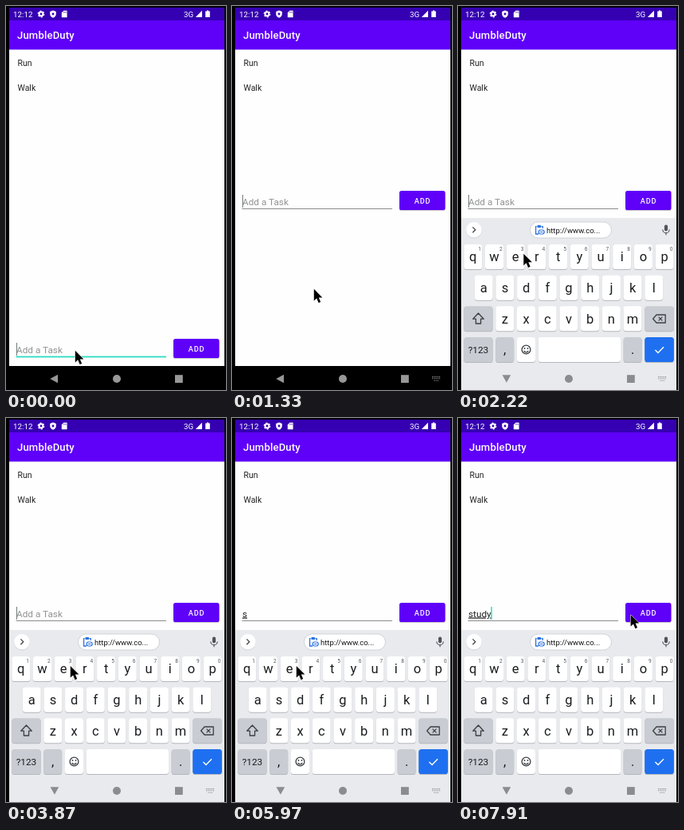
An HTML page for the animation above (8000 ms loop, 276 px wide and 480 px high).

```html
<!DOCTYPE html>
<html lang="en">
<head>
<meta charset="utf-8">
<title>To-do list</title>
<style>
  html, body { margin: 0; width: 100%; height: 100%; overflow: hidden; background: #000; }
  svg { display: block; width: 276px; height: 480px; font-family: Roboto, sans-serif; }
  .mid { text-anchor: middle; }
  .med { font-weight: 500; }
  .u { text-decoration: underline; }
</style>
</head>
<body>
<svg viewBox="0 0 276 480">
  <rect width="276" height="480" fill="#000"/>
  <rect x="4" y="2" width="270" height="17" fill="#3500b2"/>
  <rect x="4" y="18" width="270" height="37" fill="#5f00f8"/>
  <rect x="4" y="54.5" width="270" height="395.5" fill="#fefefe"/>

  <g fill="#fff" font-size="9.8">
    <text x="9" y="13.5">12:12</text>
    <circle cx="44" cy="10" r="2.4" fill="none" stroke="#fff" stroke-width="2"/>
    <circle cx="44" cy="10" r="3.8" fill="none" stroke="#fff" stroke-width="1.2" stroke-dasharray="2 1.98"/>
    <path d="M59 5.4L62.8 7V10Q62.8 13.2 59 14.8Q55.2 13.2 55.2 10V7Z"/>
    <circle cx="59" cy="10" r="1.4" fill="#3500b2"/>
    <path d="M72.4 5.8H76.6V14.2H69.8V8.4Z"/>
    <path d="M72.6 7V8.6M74 7V8.6M75.4 7V8.6" stroke="#3500b2" stroke-width=".6"/>
    <text x="223" y="13.5">3G</text>
    <path d="M246 5.8V14H237.8Z"/>
    <path d="M252 5.5H254V6.4H255.8V14H250.2V6.4H252Z"/>
  </g>
  <text class="med" x="14" y="41.2" font-size="13.1" letter-spacing=".16" fill="#fff">JumbleDuty</text>
  <g font-size="10.5" fill="#222">
    <text x="14.5" y="74.5">Run</text>
    <text x="14.5" y="106">Walk</text>
  </g>

  <g id="field">
    <rect id="line" x="12.5" width="188.5"/>
    <g font-size="11.8">
      <text id="hint" x="13" y="248.5" fill="#929292">Add a Task</text>
      <text id="typed" x="13" y="248.5" fill="#222"><tspan id="done" class="u"></tspan><tspan id="fresh"></tspan></text>
    </g>
    <rect id="caret" y="236" height="16"/>
    <rect x="210" y="232.5" width="57.5" height="23.5" rx="2.6" fill="#000" opacity=".22"/>
    <rect x="210" y="231" width="57.5" height="24" rx="2.6" fill="#5f00f8"/>
    <text class="mid med" x="239" y="247" font-size="9.2" letter-spacing=".82" fill="#fff">ADD</text>
  </g>

  <g id="board">
    <rect x="4" y="265" width="270" height="215" fill="#e8eaed"/>
    <circle cx="20" cy="280.4" r="10" fill="#cfd1d5"/>
    <circle cx="20" cy="279.8" r="9.8" fill="#fff"/>
    <path d="M18.4 276.4L21.8 279.8L18.4 283.2" fill="none" stroke="#444" stroke-width="1.3"/>
    <rect x="90.5" y="270" width="102" height="20" rx="10" fill="#fff" stroke="#d0d3d7"/>
    <path d="M98.6 275.6H97.6V285H101M104.6 275.6H106.2V278" fill="none" stroke="#2b72e0" stroke-width="1.3"/>
    <rect x="99.4" y="274" width="4.8" height="3" rx=".8" fill="#2b72e0"/>
    <rect x="101.2" y="280" width="7" height="5" rx="2.4" fill="#fff" stroke="#2b72e0" stroke-width="1.2"/>
    <path d="M103 282.5H106.4" stroke="#2b72e0"/>
    <text x="111" y="283.6" font-size="9.5" fill="#111">http://www.co...</text>
    <rect x="258.9" y="273.4" width="4.2" height="8" rx="2.1" fill="#50545a"/>
    <path d="M256.8 279.4A4.2 4.2 0 0 0 265.2 279.4M261 283.6V286.2" fill="none" stroke="#50545a" stroke-width="1.2"/>
    <g id="keys"></g>
    <g fill="none" stroke="#3c4045" stroke-width="1.3" stroke-linejoin="round">
      <path d="M25.5 384L32.3 391.2H28.6V397H22.4V391.2H18.7Z"/>
      <path d="M249 386H260.2V396H249L244.6 391ZM251.6 388.6L256.4 393.4M256.4 388.6L251.6 393.4"/>
      <circle cx="85.5" cy="429.5" r="5.4"/>
      <path d="M82.8 431A2.9 2.9 0 0 0 88.2 431"/>
    </g>
    <circle cx="83.5" cy="428" r=".9" fill="#3c4045"/>
    <circle cx="87.5" cy="428" r=".9" fill="#3c4045"/>
    <path d="M247.4 430L251 433.6L258 426.2" fill="none" stroke="#fff" stroke-width="1.4"/>
  </g>

  <g id="nav">
    <path id="back"/>
    <circle cx="139" cy="466" r="5"/>
    <rect x="212" y="461.2" width="9.8" height="9.8"/>
    <path id="imeIcon" fill="none" stroke-width="1.1"
      stroke-dasharray="1.2 1" d="M251 463.6H261M251 465.8H261M253.4 468.3H259" />
  </g>
  <path id="pointer" d="M0 0V14.6L3.4 11.5L5.8 17.2L8.4 16.1L6 10.6H10.6Z"
    fill="#000" stroke="#fff" stroke-width="1" paint-order="stroke"/>
</svg>
<script>
const LOOP = 8000;
const $ = id => document.getElementById(id);
const set = (el, attrs) => { for (const k in attrs) el.setAttribute(k, attrs[k]); };
const show = (el, on) => set(el, { visibility: on ? 'visible' : 'hidden' });

function add(parent, tag, attrs, text = '') {
  const el = document.createElementNS('http://www.w3.org/2000/svg', tag);
  set(el, attrs);
  el.textContent = text;
  parent.appendChild(el);
}

const GREY = '#c9ccd2';

function key(x, y, w, label = '', fill = '#fff', size = 16.5) {
  const box = { x, width: w, height: 31, rx: 3.6 };
  add($('keys'), 'rect', { ...box, y: y + 1, fill: '#b4b7bc' });
  add($('keys'), 'rect', { ...box, y, fill });
  const base = y + (size < 16 ? 19.8 : 21.2);
  add($('keys'), 'text', { class: 'mid', x: x + w / 2, y: base, 'font-size': size, fill: '#1b1c1e' }, label);
}

function keyRow(letters, center, y, digits) {
  [...letters].forEach((c, i) => {
    const x = center + 26.7 * i;
    key(x - 11.5, y, 23, c);
    if (digits) add($('keys'), 'text', { class: 'mid', x: x + 8.4, y: y + 7.8, 'font-size': 6.6, fill: '#55595e' }, (i + 1) % 10);
  });
}

keyRow('qwertyuiop', 18.8, 298, true);
keyRow('asdfghjkl', 32.2, 336.7);
keyRow('zxcvbnm', 58.8, 375.3);
key(7.2, 375.3, 36.5, '', GREY);
key(234.2, 375.3, 36.7, '', GREY);
key(7.2, 414, 36.5, '?123', GREY, 11.8);
key(47.2, 414, 23, ',', GREY);
key(74, 414, 23);
key(100.7, 414, 103.3);
key(207.6, 414, 23, '.', GREY);
key(234.2, 414, 36.7, '', '#1f70f0');

// Each entry: start, underlined text, newly typed text, caret shown
const typing = [
  [0, '', '', 1], [590, '', '', 0], [880, '', '', 1], [1630, '', '', 0],
  [1930, '', '', 1], [2520, '', '', 0], [2970, '', '', 1], [3570, '', '', 0],
  [3870, '', '', 1], [4470, '', '', 0], [4620, '', 's', 0], [5370, 's', '', 1],
  [5970, 's', '', 0], [6110, 's', 't', 1], [6410, 'st', 'u', 1],
  [6560, 'stu', '', 1], [6710, 'stu', 'd', 1], [7160, 'study', '', 1]
];

// Each entry: start, x, y, and the number of 150 ms steps to the next entry (0 = jump)
const moves = [
  [0, 86.8, 430.8, 0], [1330, 102.8, 353.8, 0], [1480, 100.8, 306.2, 6],
  [2370, 80.8, 310, 0], [7160, 88.8, 307.8, 5], [7910, 216.6, 246, 0]
];

const current = (list, t) => list.findLastIndex(e => e[0] <= t);

function pointerAt(t) {
  const i = current(moves, t);
  const [start, x, y, steps] = moves[i];
  if (!steps) return [x, y];
  const [end, x2, y2] = moves[i + 1];
  const p = Math.floor((t - start) / (end - start) * steps + 0.02) / steps;
  const e = p * p * (3 - 2 * p);
  return [x + (x2 - x) * e, y + (y2 - y) * e];
}

function draw(t) {
  const low = t < 590;
  const board = t >= 1480;
  set($('field'), { transform: `translate(0 ${low ? 185 : 0})` });
  set($('line'), low ? { y: 252.6, height: 1.8, fill: '#2bdcc0' } : { y: 253, height: 1, fill: '#8c8c8c' });

  const [, done, fresh, caret] = typing[current(typing, t)];
  const empty = !(done + fresh);
  $('done').textContent = done;
  $('fresh').textContent = fresh;
  show($('hint'), empty);
  show($('caret'), caret);
  set($('caret'), empty
    ? { x: 13, width: 1, fill: '#747c7b' }
    : { x: 12.6 + $('typed').getComputedTextLength(), width: 1.5, fill: '#35d9bf' });

  show($('board'), board);
  const ink = board ? '#8a8c8f' : '#989898';
  set($('nav'), { fill: ink });
  set($('imeIcon'), { stroke: ink });
  show($('imeIcon'), t >= 290);
  set($('back'), { d: t < 1630 ? 'M55.3 466L65 460.8V471.2Z' : 'M55.6 461.2H66.2L60.9 470.8Z' });
  set($('pointer'), { transform: `translate(${pointerAt(t)})` });
}

function tick(now) {
  draw(now % LOOP);
  requestAnimationFrame(tick);
}
draw(0);
requestAnimationFrame(tick);
</script>
</body>
</html>
```
